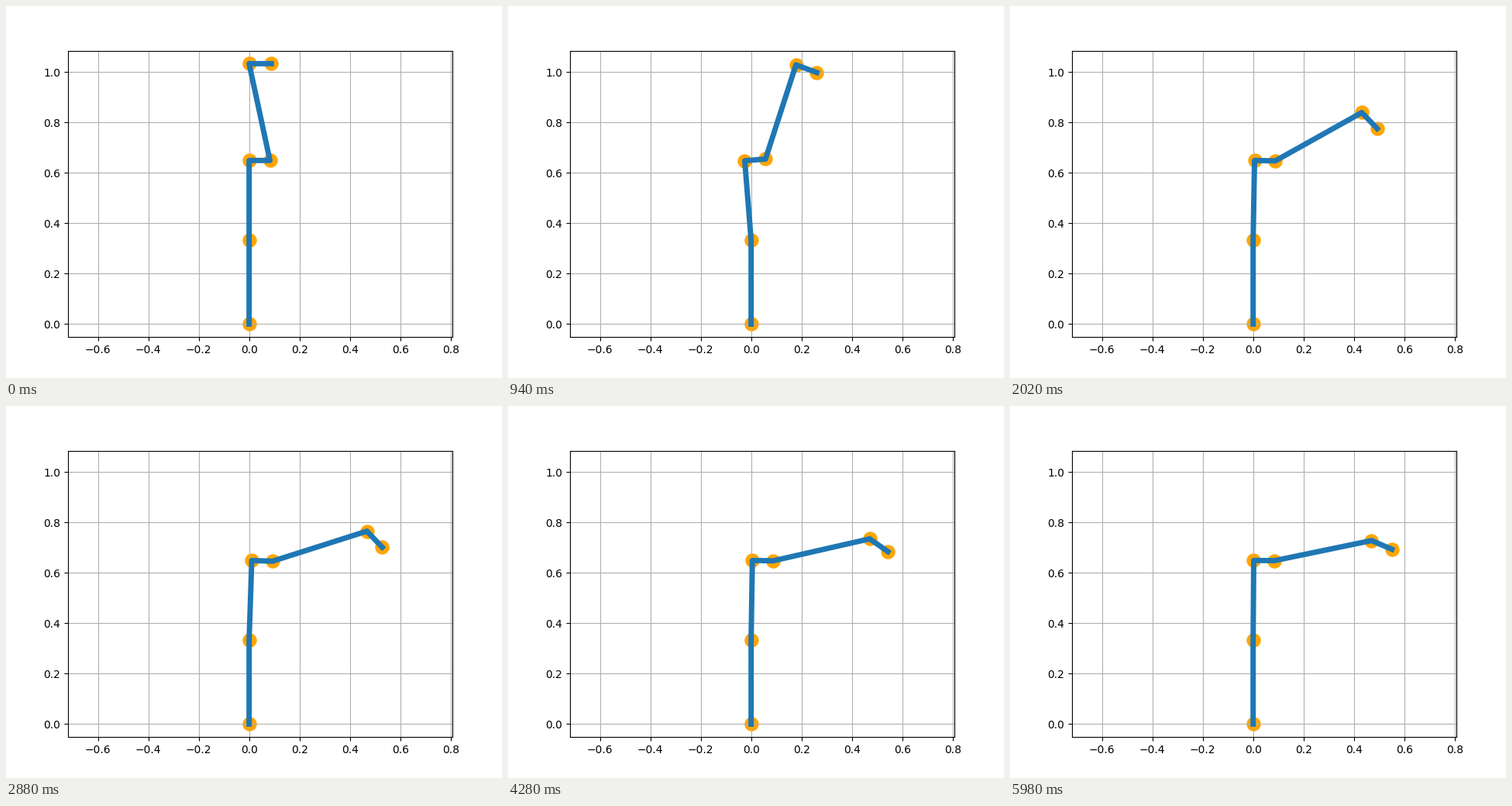
A matplotlib script for the animation above (6 s loop, 640 by 480 pixels).

```python
import numpy as np
import matplotlib.pyplot as plt
from matplotlib.animation import FuncAnimation

FRAMES, STEP = 300, 20

# Arm geometry in metres
BASE, UPPER, FOREARM = 0.333, 0.316, 0.384
OFFSET, HAND = 0.0825, 0.088


def ease(t, scale, power=2):
    """Rise from 0 at rest towards 1."""
    return 1 - np.exp(-(t / scale) ** power)


def bell(t, mid, width):
    return np.exp(-((t - mid) / width) ** 2)


def link_angles(t):
    """Clockwise angles of upper arm, forearm and hand after t seconds."""
    # The upper arm recoils, swings past upright and settles
    upper = ease(t, 0.66, 3) * (
        0.0065 + 0.07 * bell(t, 0, 3) - 0.155 * bell(t, 0.9, 0.9))
    # A quick swing followed by a slow approach
    forearm = 1.265 * ease(t, 1.35) + 0.315 * ease(t, 2.6)
    # The hand dips with the forearm, then lifts slowly
    hand = 1.1 * ease(t, 1.43) - 0.87 * ease(t, 4.7)
    return upper, forearm, hand


def along(angle):
    return np.array([np.sin(angle), np.cos(angle)])


def across(angle):
    return np.array([np.cos(angle), -np.sin(angle)])


def pose(t):
    a, b, c = link_angles(t)
    origin = np.zeros(2)
    shoulder = np.array([0, BASE])
    top = shoulder + UPPER * along(a)
    elbow = top + OFFSET * across(a)
    wrist = elbow + FOREARM * along(b) - OFFSET * across(b)
    tip = wrist + HAND * across(c)
    return np.array([origin, shoulder, top, elbow, wrist, tip])


fig, ax = plt.subplots(figsize=(6.4, 4.8), dpi=100)
ax.grid(True)

start = pose(0)
joints = ax.scatter(*start.T, s=150, color="orange")
links, = ax.plot(*start.T, color="tab:blue", linewidth=5)

# Equal scale: 5 % margin in height, width centred on the upright arm
height = BASE + UPPER + FOREARM
half = 1.1 * height * 496 / 369.6 / 2
ax.set_xlim(HAND / 2 - half, HAND / 2 + half)
ax.set_ylim(-0.05 * height, 1.05 * height)


def update(frame):
    points = pose(frame * STEP / 1000)
    joints.set_offsets(points)
    links.set_data(*points.T)
    return joints, links


anim = FuncAnimation(fig, update, frames=FRAMES, interval=STEP,
                     repeat=True, repeat_delay=0)
plt.show()
```
